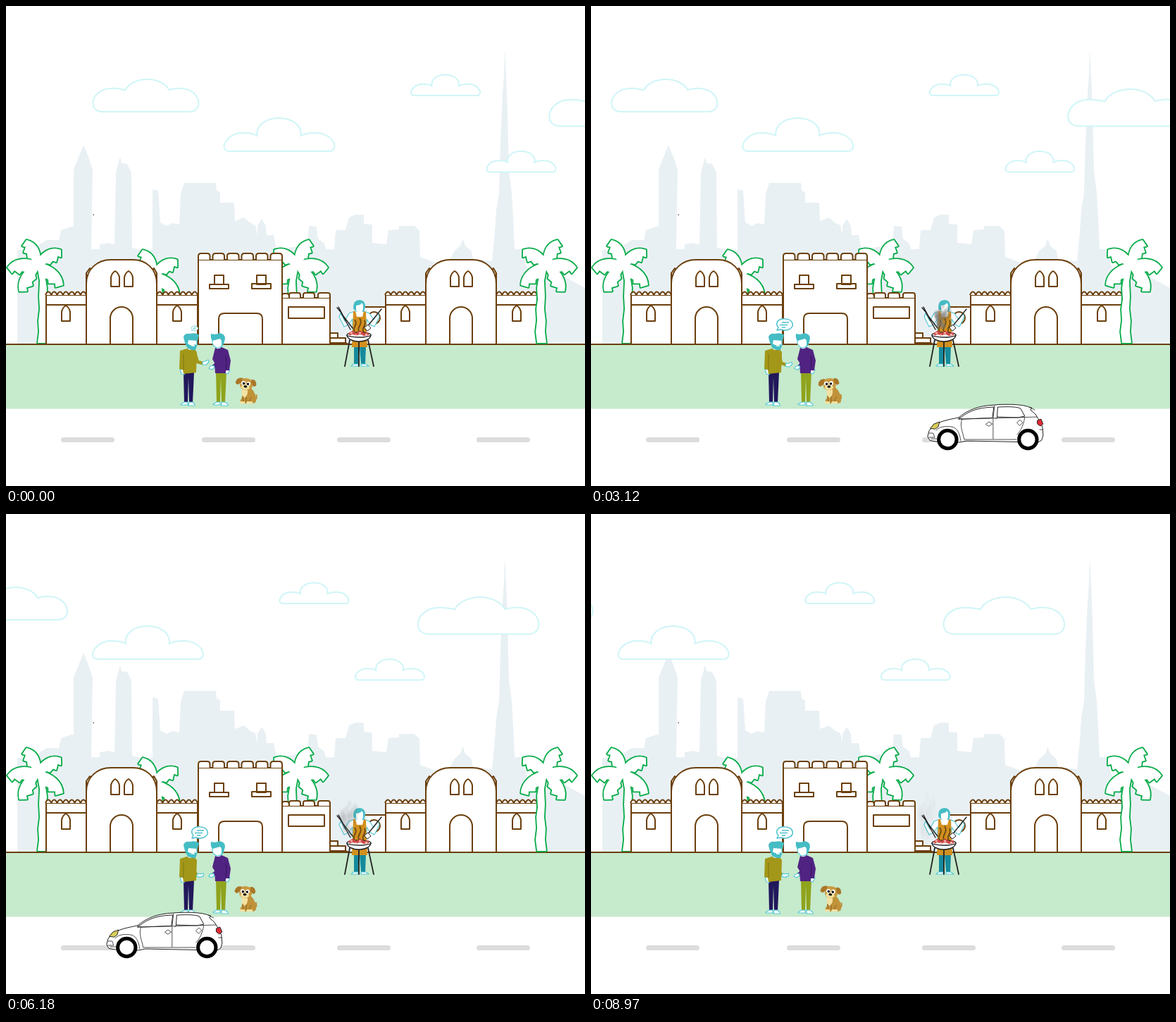
An HTML page that plays this animation: 822x681 px, repeating every 9000 ms.

```html
<!DOCTYPE html>
<html lang="en">
<head>
<meta charset="utf-8">
<title>Street scene</title>
<style>
html, body { margin: 0; width: 100%; height: 100%; overflow: hidden; background: #fff; }
svg { display: block; width: 822px; height: 681px; }
.brown { fill: #fff; stroke: #6b3f0c; stroke-width: 2; stroke-linejoin: round; }
.cloud { fill: #fff; stroke: #d0f5f7; stroke-width: 2; }
.skin { fill: #fff; stroke: #55c9d6; stroke-width: 1.2; stroke-linejoin: round; }
.hair { fill: #45bcc4; }
.ink { fill: none; stroke: #222; stroke-width: 1; stroke-linejoin: round; stroke-linecap: round; }
.tree { stroke: #06ab48; stroke-linejoin: round; }
</style>
</head>
<body>
<svg viewBox="0 0 822 681">
<defs>
  <path id="puffA" vector-effect="non-scaling-stroke" d="M14 46C6 46 0 42 0 34C0 22 12 13 26 13C34 12 42 15 46 15C50 6 64 0 77 0C92 0 104 7 108 15C112 14 120 12 126 13C140 14 150 23 150 34C150 42 144 46 137 46Z"/>
  <path id="puffB" vector-effect="non-scaling-stroke" d="M8 47C3 47 0 44 0 40C2 28 16 20 28 21C36 21 42 22 47 25C45 10 60 0 78 0C96 0 111 10 109 25C114 22 122 21 130 21C142 21 156 28 157 40C157 44 154 47 150 47Z"/>
  <path id="slit" d="M0 22V9Q1 3 6 0Q11 3 12 9V22Z"/>
  <filter id="soft" x="-50%" y="-50%" width="200%" height="200%"><feGaussianBlur stdDeviation=".09"/></filter>
  <g id="house">
    <path d="M57 480V410H114V480M214 480V410H272V480"/>
    <path d="M57 424H114M214 424H272"/>
    <path class="scallop" data-x="56"/><path class="scallop" data-x="214"/>
    <path d="M114 398V379L119 372L130 380V398ZM214 398V379L210 372L200 380V398Z"/>
    <path d="M114 480V394C114 373 130 360 149 360H180C199 360 214 373 214 394V480"/>
    <use href="#slit" x="149" y="376"/><use href="#slit" x="168" y="376"/>
    <path d="M148 480V443A16 16 0 0 1 180 443V480"/>
    <use href="#slit" x="79" y="425"/><use href="#slit" x="237" y="425"/>
  </g>
</defs>

<g fill="#e9f0f4">
  <path d="M16 480V346H40L48 338L58 332H75L78 318L93 313H96V232L104 212L110 197L117 214L123 232L121 345H133V338L145 336L154 338L156 236L160 222L162 214L164 223L172 224L178 236L179 343L190 346H208V260L216 262L219 307L228 312L236 308L246 310L248 266L253 251H298L299 262L304 264V279H324L325 305L338 300L347 308L354 311L357 325V312L363 302L369 312L370 325H380L384 345H400V480Z"/>
  <path d="M390 480V345L428 338L430 312L441 313L443 330L452 337L454 345H466L468 318L482 318L487 300L496 296H508V309L520 310V336L540 338L543 318L558 317V312H580L587 319L588 356L610 364L630 360L636 348L645 340L648.500 330L652 340L661 348L663 359L690 362L694 320L696 290L700 265L702 192L705 125L707 98L708 60L710 98L712 150L714 235L718 265L720 300L722 345H731L740 372H775L800 388L822 400V480Z"/>
</g>
<rect x="123.500" y="295.500" width="1.500" height="1.500" fill="#555"/>

<g id="clouds" class="cloud">
  <use href="#puffA" transform="translate(123.500 104)"/>
  <use href="#puffB" transform="translate(309.500 159)"/>
  <use href="#puffB" transform="translate(575 97.500) scale(.625 .628)"/>
  <use href="#puffA" transform="translate(771.500 118) scale(1.143 1.140)"/>
  <use href="#puffB" transform="translate(682.500 206) scale(.625 .628)"/>
</g>

<g id="backTrees" class="tree"></g>

<rect y="480" width="822" height="91.500" fill="#c6eacc"/>
<g class="brown">
  <path d="M512 427H538V480H512Z" stroke="none"/>
  <path d="M510 427H538"/><circle cx="522.500" cy="442.500" r="8.500"/>
  <use href="#house"/><use href="#house" x="482"/>
  <path d="M460 471H482V478H460ZM460 464H471V471H460ZM482 478L486 480"/>
  <path d="M392 480V414H460V480"/>
  <path d="M392 414V411Q392 408 395 408H399Q402 408 402 414M402 414V410Q402 407 405 407H415Q418 407 418 410V414M422 414V410Q422 407 425 407H435Q438 407 438 410V414M443 414V410Q443 407 446 407H457Q460 407 460 410V414"/>
  <path d="M401 427H452V443H401Z"/>
  <path d="M273 480V360H392V480"/>
  <g id="caps"></g>
  <path d="M296 382H309V395H296ZM289 395H316V401H289ZM356 382H369V395H356ZM349 394H376V401H349Z"/>
  <path d="M302 480V444Q302 436 310 436H356Q364 436 364 444V480"/>
  <path d="M0 480H822"/>
</g>
<g id="frontTree" class="tree"></g>
<path d="M81.500 615.500H150.500M281.500 615.500H350.500M473.500 615.500H542.500M671.500 615.500H740.500" stroke="#dcdcdc" stroke-width="7" stroke-linecap="round"/>

<g id="cook">
  <path d="M494 482H511L510 508H504L502 484L500 508H494Z" fill="#168a9c"/>
  <path class="skin" d="M493 508H500V511H490ZM504 508H511L515 511H504Z"/>
  <path class="skin" d="M495 433L487 436L481 447L475 436L473 441L480 455L486 452L492 444V460H512V444L517 452L523 455L530 441L528 436L522 445L516 436L508 433Z"/>
  <path d="M493 433L496 433L498 441H506L508 433L511 434L512 462L513 484H491L492 462Z" fill="#d2901e"/>
  <path class="hair" d="M493 428Q493 417 502 417Q510 417 510 427L508 434L505 433V423L497 425V432L494 431Z"/>
  <path d="M497 425Q503 426 505 421L507 424V430Q506 435 502 435Q498 434 497 430Z" fill="#fff"/>
  <path d="M495 463C490 456 501 453 495 445M502 463C496 456 508 452 502 443M508 463C503 457 513 453 509 446" fill="none" stroke="#6b4715" stroke-width="1.800"/>
  <g class="ink">
    <path d="M488 474L481 511M501 476V511M514 474L522 511" stroke-width="1.800"/>
    <path d="M484 467C486 479 516 479 518 467Z" fill="#fff" stroke-width="1.500"/>
    <ellipse cx="501" cy="466.500" rx="17" ry="3.500" fill="#fff" stroke-width="1.300"/>
    <path d="M470 428L475 434L489 459M472 427L479 440L492 457M533 430L512 456" stroke-width="1.400"/>
    <path d="M509 456L514 452L518 457L513 461Z" fill="#fff"/>
  </g>
  <path d="M487 466L492 463L497 466L503 463L508 466L515 465" fill="none" stroke="#cf4a48" stroke-width="4"/>
  <path d="M489 464H492M495 467H498M501 464H504M510 466H513" stroke="#f5bdb4" stroke-width="1.800"/>
</g>
<g id="smoke" filter="url(#soft)"></g>

<g id="leftMan">
  <path d="M252 520H267L265 563H260L259 527L258 563H253Z" fill="#21175b"/>
  <path class="skin" d="M253 562H258V566H249L248 565ZM260 562H265L268 565V567H259Z"/>
  <path class="skin" d="M247 515L249 522L253 523L254 516Z"/>
  <path class="skin" d="M258 483H267V491H258Z"/>
  <path d="M257 486Q262 490 267 486L271 491L270 520L252 522L251 516L246 515L247 489Z" fill="#a39719"/>
  <path d="M252 494V516" stroke="#7d7414"/>
  <g id="leftArm">
    <path d="M268 492L272 505L280 507" fill="none" stroke="#a39719" stroke-width="4.500"/>
    <path class="skin" d="M279 505L283 504L287 502L288 505L284 509L279 509Z"/>
  </g>
  <path class="skin" d="M257 472H271V481Q269 486 264 486Q258 485 257 480Z"/>
  <path class="hair" d="M254 478L252 470Q253 464 261 465Q270 463 274 467L272 475L259 474L258 479Q262 483 269 480L271 482L269 488Q261 489 257 484Z"/>
  <path d="M263 482H268" stroke="#fff" stroke-width="1.500"/>
</g>
<g id="rightMan">
  <path d="M298 519H313L311 562H306L305 527L304 562H299Z" fill="#8fa31c"/>
  <path class="skin" d="M299 562H304V566H295L294 565ZM306 562H311L315 565V567H306Z"/>
  <path class="skin" d="M312 515L311 521L315 522L318 516Z"/>
  <path class="skin" d="M298 481H306V489H298Z"/>
  <path d="M297 485Q302 488 306 484L315 488L319 503L317 517L312 517V521H297L296 506L293 501Z" fill="#502382"/>
  <path d="M312 496L313 504L312 516" stroke="#35155f" fill="none"/>
  <g id="rightArm">
    <path d="M298 493L300 507L294 512" fill="none" stroke="#502382" stroke-width="5"/>
    <path class="skin" d="M295 510L290 511L288 514L292 516L296 513Z"/>
  </g>
  <path class="skin" d="M293 471H308V479Q306 485 300 485Q294 483 293 478Z"/>
  <path class="hair" d="M291 465Q298 467 303 464Q311 465 311 472L309 480L306 483V475L304 472L293 475Q290 471 291 465Z"/>
</g>
<g id="bubble" fill="#fff" stroke="#4bc0cc" stroke-width="1.500">
  <path d="M264 460L266 456Q263 453 264 449C267 442 283 442 286 450C288 458 277 462 270 459Z" stroke-linejoin="round"/>
  <path d="M271 449H281M268 452.500H279M271 456H276"/>
</g>

<g id="dog" stroke-linejoin="round">
  <path id="tail" d="M351 560Q357 559 355 551" fill="none" stroke="#b98a35" stroke-width="2"/>
  <path d="M336 541H347Q356 550 355 561Q354 564 348 564H334Q331 560 335 556Z" fill="#c0923a"/>
  <path d="M335 544H343Q344 552 339 556L335 553Z" fill="#f3e1a2"/>
  <path d="M336 553L337 562M341 554V562M347 563Q344 558 349 555" fill="none" stroke="#80591d" stroke-width=".8"/>
  <path d="M332 561H339V564H332ZM342 561H350V564H341Z" fill="#f3e1a2"/>
  <g id="head">
    <path d="M331 530Q338 526 346 530L348 539Q346 545 339 545Q331 545 330 539Z" fill="#c99a40"/>
    <path d="M333 529Q325 527 323 536Q326 542 331 535ZM345 529Q352 527 353 536Q350 541 346 535Z" fill="#a97728"/>
    <ellipse cx="338" cy="541" rx="6" ry="3.700" fill="#f3e1a2"/>
    <circle cx="334.500" cy="535.500" r="3" fill="#fff"/><circle cx="341.500" cy="535.500" r="3" fill="#fff"/>
    <circle cx="335" cy="536" r="1.700"/><circle cx="341" cy="536" r="1.700"/>
    <ellipse cx="338" cy="540" rx="2.400" ry="1.600"/>
  </g>
</g>

<g id="car" class="ink">
  <path fill="#fff" d="M3 616L0 611L2 603L7 596C17 589 33 586 44 584C57 573 72 567 95 566C117 564 138 566 144 569L148 570L146 573Q154 578 158 587L163 597L164 609L162 616L157 619L55 617L45 619L13 618Z"/>
  <path d="M44 586C58 575 69 570 94 569L92 584ZM100 569C118 568 128 569 132 571L138 582L128 584L99 583Z"/>
  <path d="M95 567L93 586V614M49 586C45 596 50 604 52 615H126M99 583L97 586M138 584C136 594 133 602 127 608M44 584L50 586L155 583M12 602C17 596 27 596 34 597C42 598 46 607 47 617" stroke-width=".8"/>
  <path d="M83 593L87 590L92 593L87 596ZM127 591L131 587L135 591L131 595ZM2 606H8L10 612H2M152 573L144 569M159 601H164M5 614H13" stroke-width=".8"/>
  <path d="M4 599L9 593L17 590L15 597L11 600Z" fill="#d9cd58"/>
  <path d="M156 588L161 586L164 593L160 596L156 593Z" fill="#e12b36"/>
  <g fill="#fff" stroke="#000" stroke-width="5">
    <circle cx="28.500" cy="615" r="12.700"/><circle cx="142.500" cy="615" r="12.700"/>
  </g>
</g>
</svg>
<script>
const LOOP = 9000, STEP = 30;
const byId = id => document.getElementById(id);
const move = (id, value) => byId(id).setAttribute('transform', value);
const mix = (a, b, k) => a + (b - a) * k;
const ease = (t, from, to) => {
  const k = Math.min(1, Math.max(0, (t - from) / (to - from)));
  return k * k * (3 - 2 * k);
};

// Walls
for (const p of document.querySelectorAll('.scallop'))
  p.setAttribute('d', `M${p.dataset.x} 410` + 'q4.150 -9 8.300 0'.repeat(7));
let caps = '';
for (let i = 0; i < 6; i++)
  caps += `<path d="M${273 + i * 20.5} 360v-5q0-4 4-4h8.500q4 0 4 4v5"/>`;
byId('caps').innerHTML = caps;

// Palm: five leaves around a hub, smooth above and toothed below
const hub = [45, 367];
const tips = [[2, 371], [29, 332], [78, 346], [81, 396], [19, 405]];
const teeth = [[.86, 9], [.78, 5], [.62, 11], [.54, 7], [.38, 9], [.3, 5]];

function leaf([tx, ty]) {
  const [cx, cy] = hub;
  const dx = tx - cx, dy = ty - cy, len = Math.hypot(dx, dy);
  const side = dx < 0 ? 1 : -1;
  const at = (u, w) =>
    `${cx + dx * u - dy / len * w * side} ${cy + dy * u + dx / len * w * side}`;
  const edge = teeth.map(([u, w]) => `L${at(u, -w)}`).join('');
  return `M${at(0, 4)}C${at(.35, 12)} ${at(.75, 13)} ${at(1, 0)}${edge}L${at(0, -4)}Z`;
}

const trunk = 'M45 478L47 462L46 447L48 430L47 412L48 390L44 368L53 368L56 388L58 400L57 416L59 430L58 446L60 462L58 478Z';
const parts = [trunk, ...tips.map(leaf)];
const paint = style => parts.map(d => `<path d="${d}" ${style}/>`).join('');
// Wide strokes first, fills on top, so only the joint outline stays
const palm = place => `<g transform="${place}">` +
  paint('fill="none" stroke-width="3.600"') + paint('fill="#fff" stroke="none"') + '</g>';
byId('backTrees').innerHTML =
  palm('') + palm('translate(165 14)') + palm('matrix(-1 0 0 1 459 0)');
byId('frontTree').innerHTML = palm('matrix(-1 0 0 1 812 0)');

// Smoke puffs and curls inside a unit circle
let seed = 7;
const rand = () => (seed = seed * 16807 % 2147483647) / 2147483647;
let puffs = '';
for (let i = 0; i < 26; i++) {
  const a = rand() * 6.28, r = Math.sqrt(rand()) * .75;
  const x = Math.cos(a) * r, y = Math.sin(a) * r, s = .12 + rand() * .2;
  puffs += i % 2
    ? `<circle cx="${x}" cy="${y}" r="${s}" fill="#777" opacity=".45"/>`
    : `<path d="M${x} ${y + s}q${-s * 2} ${-s} 0 ${-s * 2}t${s / 2} ${-s}" fill="none" stroke="#666" stroke-width=".12" opacity=".5"/>`;
}
byId('smoke').innerHTML = puffs;

// time, x, y, half width, half height, opacity
const smokeKeys = [
  [1200, 502, 461, 6, 4, 0],
  [2190, 502, 449, 10, 11, .85],
  [3120, 499, 443, 13, 17, .9],
  [4470, 491, 438, 15, 23, .65],
  [5400, 489, 435, 15, 22, .45],
  [6930, 485, 433, 14, 24, .25],
  [9000, 477, 433, 14, 32, .1]
];
function smokeAt(t) {
  const last = smokeKeys.length - 1;
  let i = 0;
  while (i < last - 1 && t > smokeKeys[i + 1][0]) i++;
  const a = smokeKeys[i], b = smokeKeys[i + 1];
  const k = Math.max(0, (t - a[0]) / (b[0] - a[0]));
  return a.map((v, n) => mix(v, b[n], k));
}

function draw(t) {
  move('clouds', `translate(${-.0302 * t} 0)`);
  move('car', `translate(${819.5 - .1095 * t} 0)`);
  byId('car').setAttribute('visibility', t > 0 && t < LOOP - STEP ? 'visible' : 'hidden');

  const grow = mix(.38, 1, ease(t, -100, 600));
  move('bubble', `translate(263 461) scale(${grow}) translate(-263 -461)`);

  const drop = ease(t, 2700, 3700);
  move('leftArm', `rotate(${drop * 21} 269 494) translate(${-drop * 1.5} ${drop * 3})`);
  move('rightArm', `rotate(${2 * Math.sin(t / LOOP * Math.PI * 10)} 298 493)`);

  const sway = Math.sin((t / 1800 + .08) * Math.PI * 2);
  move('head', `translate(${1 + sway} 0) rotate(${4 + sway * 9} 339 543)`);
  move('tail', `rotate(${sway * 5} 351 560)`);

  const [, x, y, rx, ry, alpha] = smokeAt(t);
  move('smoke', `translate(${x} ${y}) scale(${rx} ${ry})`);
  byId('smoke').setAttribute('opacity', alpha);
}

const start = performance.now();
function tick() {
  const t = (performance.now() - start) % LOOP;
  draw(Math.floor(t / STEP) * STEP);
  requestAnimationFrame(tick);
}
tick();
</script>
</body>
</html>
```
